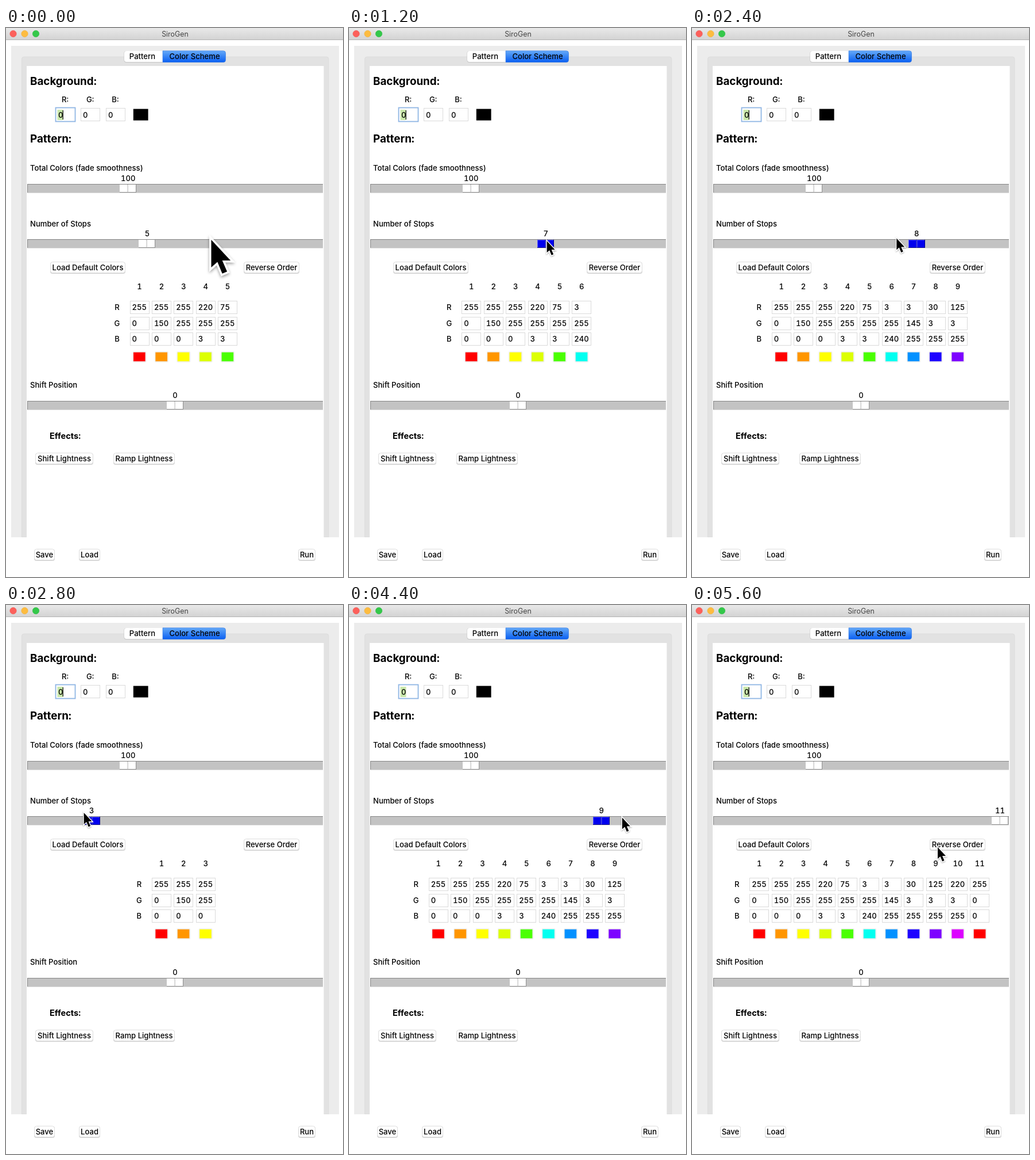
Animation, 587 px wide and 954 px high, one loop 5800 ms. Source, as an HTML page:

```html
<!DOCTYPE html>
<html lang="en">
<head>
<meta charset="utf-8">
<title>SiroGen</title>
<style>
html, body { margin: 0; width: 100%; height: 100%; overflow: hidden; background: #fff }
svg { display: block; width: 100vw; height: 100vh }
text { font: 500 13.1px Inter, sans-serif; font-variant-numeric: tabular-nums; white-space: pre }
.mid { text-anchor: middle }
.head { font-size: 18.8px; font-weight: 700 }
.sub { font-size: 14.6px; font-weight: 700 }
.title { font-size: 12.4px; font-weight: 400; fill: #444 }
</style>
</head>
<body>
<svg viewBox="0 0 587 954">
  <defs>
    <linearGradient id="bar" x2="0" y2="1"><stop stop-color="#e9e9e9"/><stop offset="1" stop-color="#d3d3d3"/></linearGradient>
    <linearGradient id="tab" x2="0" y2="1"><stop stop-color="#64a9f8"/><stop offset="1" stop-color="#0a5ff2"/></linearGradient>
    <filter id="shade" x="-50%" y="-50%" width="200%" height="200%"><feDropShadow dx="0" dy="1" stdDeviation="1.2" flood-opacity=".4"/></filter>
  </defs>
  <g id="base"></g>
  <g id="live"></g>
</svg>
<script>
const STEP = 200, STEPS = 29, PITCH = 38.4;
const PRESS = 4, RELEASE = 24, REDRAW = 18; // in steps
const hues = [0, 35, 60, 68, 102, 176, 206, 247, 269, 292, 360];
// pointer path: step, x, y
const path = [[0, 357.5, 368], [4, 241, 370], [10, 552, 371], [11, 515, 369], [13.3, 150, 361],
  [15.3, 109, 361], [23.3, 547, 371], [25, 538, 376], [28, 428, 421]];

const clamp = (v, lo, hi) => Math.min(hi, Math.max(lo, v));
const rect = (x, y, w, h, fill, more = '') =>
  `<rect x="${x}" y="${y}" width="${w}" height="${h}" fill="${fill}" ${more}/>`;
const text = (x, y, s, cls = '') => `<text x="${x}" y="${y}" class="${cls}">${s}</text>`;
const mid = (x, y, s) => text(x, y, s, 'mid');
const dot = (x, fill, edge) => `<circle cx="${x}" cy="10" r="5.7" fill="${fill}" stroke="${edge}" stroke-width=".6"/>`;
const field = (x, y, w, h) => rect(x + .5, y + .5, w - 1, h - 1, '#fff', 'stroke="#dadada"');

const button = (x, y, w, label) =>
  rect(x, y + 1, w, 20, '#d2d2d2', 'rx="4"') +
  rect(x + .5, y + .5, w - 1, 19, '#fff', 'rx="4" stroke="#dedede"') +
  mid(x + w / 2, y + 14.6, label);

const track = y => rect(37, y, 515, 16, '#c3c3c3') +
  rect(37, y, 515, 1, '#858585') + rect(37, y, 1, 16, '#858585') + rect(37, y + 15, 515, 1, '#dcdcdc');

function knob(x, y, value, active) {
  const [face, light, dark] = active ? ['#0000ee', '#5a5aff', '#000090'] : ['#fff', '#fff', '#8e8e8e'];
  const half = left => rect(left, y + 1, 14.5, 14, dark) + rect(left, y + 1, 13.5, 13, light) +
    rect(left + 1, y + 2, 12.5, 12, face);
  const left = Math.round(x - 14.5);
  return half(left) + half(left + 14.5) + mid(x, y - 4.8, value);
}

// Red, green and blue of a hue, rounded to fives
function rgb(hue) {
  const floor = hue > 60 && hue < 360 ? 3 : 0;
  return [0, 240, 120].map(turn => {
    const level = clamp(Math.abs((hue + turn) / 60 % 6 - 3) - 1, 0, 1);
    return Math.max(floor, Math.round(level * 51) * 5);
  });
}

function pointerAt(k) {
  const j = Math.max(1, path.findIndex(p => p[0] >= k)), [a, ax, ay] = path[j - 1], [b, bx, by] = path[j];
  const u = (k - a) / (b - a);
  return [ax + (bx - ax) * u, ay + (by - ay) * u];
}

const knobX = n => 149 + (n - 3) * 48.45;

// Stops set by the drag; the slider trails the pointer, the table trails more
function stopsAt(k) {
  const [x] = pointerAt(clamp(k, PRESS, RELEASE));
  return clamp(Math.round(3 + (x - knobX(3)) / 48.45), 1, 11);
}

function base() {
  let s = rect(0, 0, 587, 20, 'url(#bar)') + rect(0, 20, 587, 1, '#b4b4b4') +
    dot(12.5, '#fc605b', '#ef544f') + dot(32.5, '#fdbc40', '#eeae38') + dot(52, '#34c84a', '#2dba40') +
    text(294.5, 14.5, 'SiroGen', 'mid title') +
    rect(9, 31, 571, 854, '#ececec') +
    '<path d="M27.5 885V54q0-4 4-4H558q4 0 4 4V885Z" fill="#e2e2e2" stroke="#dcdcdc"/>' +
    rect(36, 66, 517.5, 819, '#fff') + rect(0, 885, 587, 69, '#fff') +
    rect(205.5, 40, 177, 20, '#c6c6c6', 'rx="4"') + rect(206, 40, 90, 19, '#fff', 'rx="4"') +
    '<path d="M273 39.7H378.5q4 0 4 4V55.500q0 4-4 4H273Z" fill="url(#tab)" stroke="#2e76e6" stroke-width=".6"/>' +
    mid(237.5, 54.2, 'Pattern') + mid(328.5, 54.2, 'Color Scheme') +
    text(42, 99.3, 'Background:', 'head') + text(42, 198.7, 'Pattern:', 'head') +
    text(42, 248.2, 'Total Colors (fade smoothness)') + text(42, 344.8, 'Number of Stops') +
    text(42, 625.2, 'Shift Position') + text(76, 713.8, 'Effects:', 'sub');
  ['R:', 'G:', 'B:'].forEach((c, i) => s += mid(103 + i * 43.7, 129.3, c));
  s += field(130, 139, 34, 23) + field(174, 139, 34, 23) + text(134, 155.7, 0) + text(178, 155.7, 0) +
    rect(86.5, 138.5, 34, 24, '#fff', 'stroke="#8fb6e4" stroke-width="1.8"') +
    rect(221.8, 140.6, 25.8, 20, '#000');
  s += track(271) + track(367) + track(648) + knob(212.7, 271, 100) + knob(294.6, 648, 0);
  return s + button(77, 406, 131, 'Load Default Colors') + button(414, 406, 97, 'Reverse Order') +
    button(51, 738, 101, 'Shift Lightness') + button(187, 738, 107, 'Ramp Lightness') +
    button(49, 905, 36, 'Save') + button(127, 905, 37, 'Load') + button(509, 905, 30, 'Run');
}

// While redrawing, the fields are missing and half of the old labels remain
function table(n, redrawing) {
  const left = 309.3 - (n - 1) / 2 * PITCH;
  const rowY = r => 490 + r * 27.5;
  let s = '';
  [...'RGB'].forEach((label, r) => {
    if (redrawing) s += mid(left - 39 + PITCH / 2, rowY(r), label) + rect(224, rowY(r) - 12, 8, 16, '#fff');
    s += mid(left - 39, rowY(r), label);
  });
  hues.slice(0, n).forEach((hue, i) => {
    const x = left + i * PITCH, color = rgb(hue);
    if (!redrawing) color.forEach((c, r) => {
      s += field(Math.round(x - 17), Math.round(rowY(r) - 16), 34, 23) + text(x - 13, rowY(r) + .4, c);
    });
    s += mid(x, 454.3, i + 1) + rect(x - 12, 562, 24, 19, '#efefef', 'rx="2"') +
      rect(x - 10.5, 563.6, 20.6, 15.6, `rgb(${color})`);
  });
  return s;
}

function pointer(k) {
  const size = Math.max(1, 2.4 - k * .9);
  return `<path transform="translate(${pointerAt(k)}) scale(${size})" filter="url(#shade)"
    d="M0 0V20L4.5 16L8 24.5L11.5 23L8 15H14Z" stroke="#fff" stroke-width="2.8" paint-order="stroke"/>`;
}

function entry(k) {
  const phase = k / 4.3 % 1, caret = phase < .01 || phase > .25;
  return rect(89.5, 142, 10, 18, '#c9e8ab') + text(91, 155.7, 0) +
    (caret ? rect(98.6, 143, 1.2, 16, '#000') : '');
}

function draw(k) {
  const n = stopsAt(k - .3);
  live.innerHTML = entry(k) + knob(knobX(n), 367, n, k >= PRESS && k <= RELEASE) +
    table(stopsAt(k - .65), k == REDRAW) + pointer(k);
}

const live = document.getElementById('live');
document.getElementById('base').innerHTML = base();
let shown = -1;
function tick() {
  const k = Math.floor(performance.now() / STEP) % STEPS;
  if (k != shown) draw(shown = k);
  requestAnimationFrame(tick);
}
tick();
</script>
</body>
</html>
```
